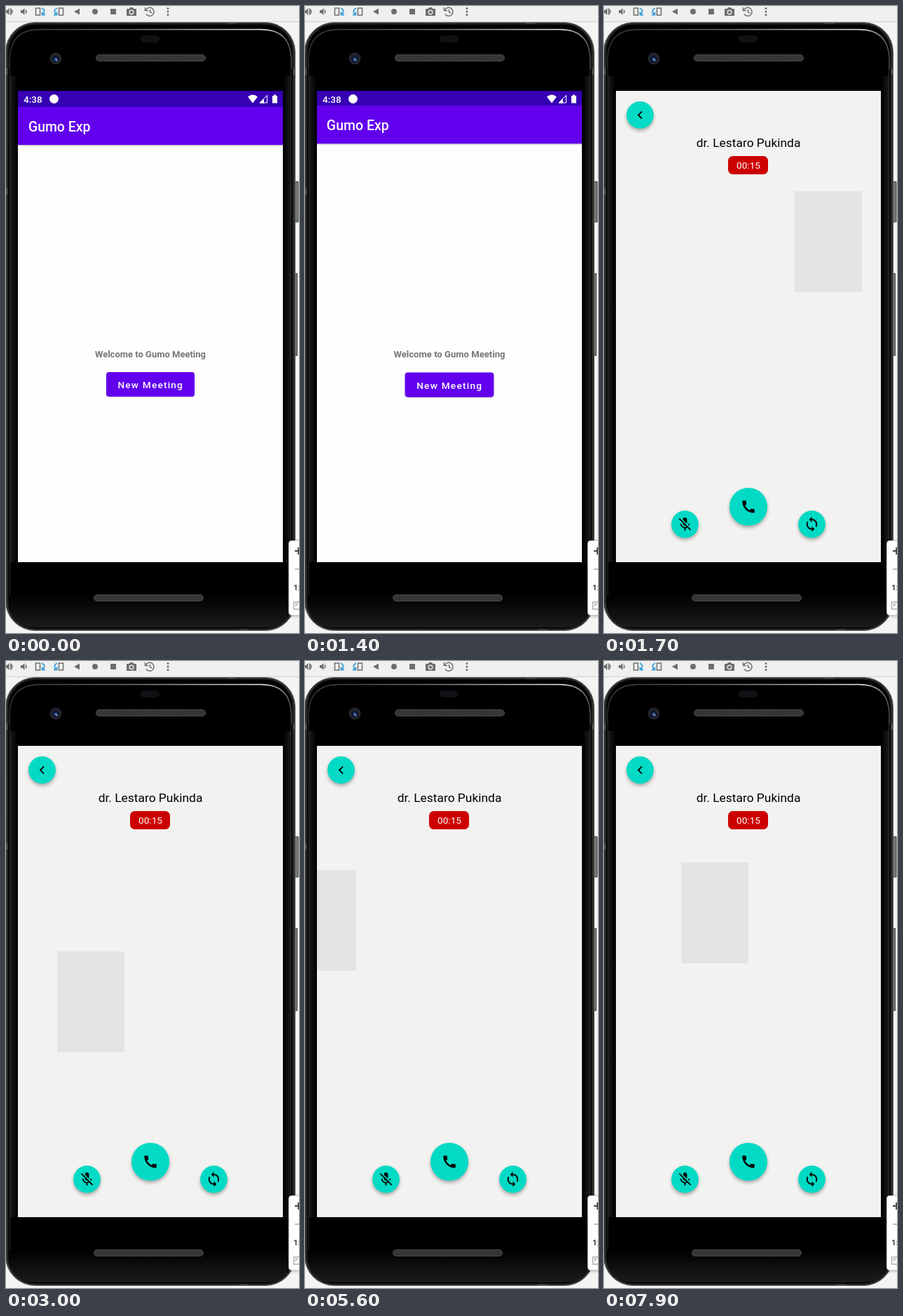
An HTML page that plays this animation: 418 by 894 pixels, repeating every 8 s.

```html
<!DOCTYPE html>
<html lang="en">
<head>
<meta charset="utf-8">
<title>Meeting demo</title>
<style>
  html, body { margin: 0; width: 100%; height: 100%; overflow: hidden; background: #f4f4f3; }
  svg { display: block; width: 418px; height: 894px; font-family: Roboto, sans-serif; }
  .mid { text-anchor: middle; }
  .line { fill: none; stroke: #6e6e6e; stroke-width: 1.5; }
  .blue { fill: none; stroke: #389fd6; stroke-width: 1.8; }
  .fab circle { fill: #03dac5; filter: drop-shadow(0 3px 2.5px rgba(0, 0, 0, .3)); }
</style>
</head>
<body>
<svg viewBox="0 0 418 894">
  <defs>
    <clipPath id="screen"><path d="M17 121H395V793H17z"/></clipPath>
    <pattern id="mesh" width="3" height="4" patternUnits="userSpaceOnUse">
      <rect width="3" height="4" fill="#151515"/>
      <path d="M0 0L1.5 2L0 4M1.5 0L3 2L1.5 4" fill="none" stroke="#555" stroke-width=".8"/>
    </pattern>
    <linearGradient id="shine">
      <stop offset="0" stop-color="#333"/><stop offset=".45" stop-color="#777"/>
      <stop offset=".9" stop-color="#eee"/><stop offset="1" stop-color="#555"/>
    </linearGradient>
    <linearGradient id="chin" x2="0" y2="1">
      <stop offset=".5" stop-color="#000"/><stop offset="1" stop-color="#1b1c1b"/>
    </linearGradient>
    <linearGradient id="edge">
      <stop offset="0" stop-color="#1d1e1d"/><stop offset="1" stop-color="#000"/>
    </linearGradient>
    <g id="speaker">
      <rect x=".5" y=".5" width="156" height="9" rx="4.5" fill="url(#mesh)" stroke="#4a4a48"/>
    </g>
    <g id="volume">
      <path d="M-5 -2H-2.500L.5 -5V5L-2.500 2H-5z" fill="#6e6e6e"/>
      <path class="line" d="M2 -2.500Q4 0 2 2.500"/>
    </g>
  </defs>

  <!-- emulator toolbar -->
  <rect width="418" height="22" fill="#f0f0ef"/>
  <path d="M0 22.500H418" stroke="#d0d0cf"/>
  <use href="#volume" x="4" y="8"/>
  <path class="line" d="M6 3.500Q12 8 6 12.500"/>
  <use href="#volume" x="26" y="8"/>
  <path class="line" d="M42.500 3H48.500V13H42.500zM75.500 3H81.500V13H75.500z"/>
  <path class="blue" d="M51 3Q58 7 52 12M56 12.500H51.500V8.500M73 3Q66 7 72 12M68 12.500H72.500V8.500"/>
  <path d="M97 8L105 3.500V12.500zM149 4H157V12H149zM172 4H175.500L177 2H181L182.500 4H186V14H172z" fill="#6e6e6e"/>
  <circle cx="127" cy="8" r="4" fill="#6e6e6e"/>
  <circle cx="179" cy="9" r="2.800" fill="#6e6e6e" stroke="#f0f0ef" stroke-width="1.300"/>
  <path class="line" d="M199.500 6A6 6 0 1 1 200 11.500M198.500 2V6.500H203M205.500 5V8.500L208 10"/>
  <path d="M231 3.500v0M231 8v0M231 12.500v0" stroke="#6e6e6e" stroke-width="3" stroke-linecap="round"/>

  <!-- phone body -->
  <path d="M412 250.500H417V308H412zM412 381.500H415.500V498.500H412z" fill="#777875" stroke="#454644"/>
  <rect x="-.5" y="23.500" width="413" height="867" rx="42" fill="#30322f" stroke="#5b5d5a"/>
  <path d="M0 89H5V98H0zM408 89H413V98H408zM0 260H5V269H0zM315 23H328V27H315zM332 887H345V891H332z" fill="#555753"/>
  <rect x="3" y="26" width="406" height="862" rx="39" fill="#000" stroke="#181918" stroke-width="1.500"/>
  <path d="M5 100H16V800H5z" fill="url(#edge)"/>
  <path d="M5 100H16V800H5z" fill="url(#edge)" transform="matrix(-1 0 0 1 412 0)"/>
  <path d="M5 793H407V850Q407 886 370 886H42Q5 886 5 850z" fill="url(#chin)"/>
  <path d="M5 90V76Q6 33.500 48 33.500H364Q406 33.500 407 76V90" fill="none" stroke="url(#shine)" stroke-width="1.300"/>
  <path d="M5.500 90V840M406.500 90V840" stroke="#2c2d2b"/>
  <rect x="192" y="42" width="27" height="10" rx="5" fill="#101114"/>
  <circle cx="71" cy="75" r="8.500" fill="#23252b"/>
  <circle cx="71" cy="75.500" r="5" fill="#0c1730"/>
  <circle cx="71" cy="76" r="2.300" fill="#3e63a6"/>
  <circle cx="72.500" cy="77.500" r=".9" fill="#b5cdf5"/>
  <use href="#speaker" x="128" y="69"/>
  <use href="#speaker" x="125" y="839"/>

  <!-- magnifier panel -->
  <rect x="403.500" y="762.500" width="30" height="106" rx="4" fill="#fff" stroke="#cfcfcf" style="filter:drop-shadow(0 1px 2px rgba(0,0,0,.3))"/>
  <path d="M412 777H422M417 772V782" stroke="#444" stroke-width="1.800"/>
  <path d="M412 803H422" stroke="#aaa" stroke-width="1.500"/>
  <text x="410" y="833" font-size="11.500" font-weight="700" fill="#444">1:1</text>
  <path d="M410.500 850H424V860H410.500zM413.500 856V853H416.500" fill="none" stroke="#aaa" stroke-width="1.300"/>

  <g clip-path="url(#screen)">
    <g id="home">
      <path d="M17 121H395V793H17z" fill="#fefefe"/>
      <path d="M17 144H395V198H17z" fill="#6200ee" style="filter:drop-shadow(0 1px 1px rgba(0,0,0,.3))"/>
      <path d="M17 121H395V144H17z" fill="#3700b3"/>
      <text x="32" y="179" font-size="19.400" font-weight="500" fill="#fff">Gumo Exp</text>
      <text class="mid" x="206" y="501" font-size="13" font-weight="700" fill="#757575">Welcome to Gumo Meeting</text>
      <rect id="button" x="143" y="522" width="126" height="35" rx="4" fill="#6200ee"/>
      <rect id="ripple" x="143" y="522" width="126" height="35" rx="4" fill="#fff"/>
      <text x="159.500" y="545" font-size="13.600" font-weight="500" letter-spacing="1.210" fill="#fff">New Meeting</text>
    </g>
    <g id="status" fill="#fff">
      <text x="25" y="138" font-size="13.600" font-weight="500">4:38</text>
      <circle cx="68.500" cy="132.500" r="6.500"/>
      <path d="M352 138.500L345 129.500Q352 123.500 359 129.500zM380 128H382V126.500H385V128H387V138.500H380zM368 132V138.500H361.500z"/>
      <path d="M372.500 127.500V138H362z" fill="none" stroke="#fff"/>
    </g>
    <g id="call">
      <path d="M17 121H395V793H17z" fill="#f2f2f0"/>
      <rect id="tile" width="96" height="144" fill="#e4e4e2"/>
      <text class="mid" x="206" y="201" font-size="17.400">dr. Lestaro Pukinda</text>
      <rect x="177" y="214" width="57" height="26" rx="6.500" fill="#c00"/>
      <text class="mid" x="206" y="232" font-size="13.600" fill="#fff">00:15</text>
      <g id="fabs"></g>
    </g>
  </g>
</svg>
<script>
const $ = id => document.getElementById(id);

const icons = {
  back: 'M15.41 7.41L14 6l-6 6 6 6 1.41-1.41L10.83 12z',
  phone: 'M20.01 15.38c-1.23 0-2.42-.2-3.53-.56-.35-.12-.74-.03-1.01.24l-1.57 1.97c-2.83-1.35-5.48-3.9-6.89-6.83l1.95-1.66c.27-.28.35-.67.24-1.02-.37-1.11-.56-2.3-.56-3.53 0-.54-.45-.99-.99-.99H4.19C3.65 3 3 3.24 3 3.99 3 13.28 10.73 21 20.01 21c.71 0 .99-.63.99-1.18v-3.45c0-.54-.45-.99-.99-.99z',
  muted: 'M19 11h-1.7c0 .74-.16 1.43-.43 2.05l1.23 1.23c.56-.98.9-2.09.9-3.28zm-4.02.17c0-.06.02-.11.02-.17V5c0-1.66-1.34-3-3-3S9 3.34 9 5v.18l5.98 5.99zM4.27 3L3 4.27l6.01 6.01V11c0 1.66 1.33 3 2.99 3 .22 0 .44-.03.65-.08l1.66 1.66c-.71.33-1.5.52-2.31.52-2.76 0-5.3-2.1-5.3-5.1H5c0 3.41 2.72 6.23 6 6.72V21h2v-3.28c.91-.13 1.77-.45 2.54-.9L19.73 21 21 19.73z',
  sync: 'M12 4V1L8 5l4 4V6c3.31 0 6 2.69 6 6 0 1.01-.25 1.97-.7 2.8l1.46 1.46C19.54 15.03 20 13.57 20 12c0-4.42-3.58-8-8-8zm0 14c-3.31 0-6-2.69-6-6 0-1.01.25-1.97.7-2.8L5.24 7.74C4.46 8.97 4 10.43 4 12c0 4.42 3.58 8 8 8v3l4-4-4-4v3z'
};
const fab = (x, y, r, icon) => `<g class="fab" transform="translate(${x} ${y})">
  <circle r="${r}"/><path d="${icons[icon]}" transform="scale(.97) translate(-12 -12)"/></g>`;
$('fabs').innerHTML = fab(51.5, 155.5, 19.4, 'back') + fab(206, 714, 27.1, 'phone') +
  fab(115.5, 739, 19.4, 'muted') + fab(296.5, 739, 19.4, 'sync');

// Keys are [time, value, ...]; values between keys are linear.
const press = [[800, 0], [900, .06], [1000, .16], [1200, .21], [1300, .12], [1400, 0]];
const lift = [[900, 0], [1100, 1], [1300, 1], [1400, .1]];
const enter = [[1372, 0], [1400, .043], [1500, .857], [1600, .965], [1700, 1]];
const drag = [
  [2000, 272, 264], [2100, 266, 262], [2300, 241, 258], [2400, 216, 312], [2500, 187, 377],
  [2800, 24, 414], [2900, 40, 416], [3000, 73, 414], [3400, 138, 270], [3800, 196, 114],
  [3900, 232, 110], [4000, 270, 109], [4200, 306, 126], [4400, 265, 158], [4600, 199, 183],
  [4800, 118, 263], [5100, 89, 281], [5300, 62, 286], [5400, 36, 288], [5600, -23, 298],
  [6000, -23, 298], [6300, 75, 322], [6600, 210, 364], [6900, 290, 378],
  [7100, 279, 378], [7300, 255, 374], [7600, 168, 346], [7800, 118, 313], [7900, 110, 287]
];

function at(keys, t) {
  const i = keys.findIndex(k => k[0] > t);
  if (i === 0) return keys[0].slice(1);
  if (i < 0) return keys[keys.length - 1].slice(1);
  const a = keys[i - 1], b = keys[i], p = (t - a[0]) / (b[0] - a[0]);
  return a.slice(1).map((v, j) => v + (b[j + 1] - v) * p);
}

const grow = s => `translate(206 457) scale(${s}) translate(-206 -457)`;

function draw(t) {
  const [p] = at(enter, t), [z] = at(lift, t);
  $('ripple').setAttribute('opacity', at(press, t)[0]);
  $('button').style.filter = `drop-shadow(0 ${1 + 3 * z}px ${1 + 3 * z}px rgba(0,0,0,${.15 + .15 * z}))`;
  $('home').setAttribute('transform', grow(1 + .15 * p));
  $('call').setAttribute('transform', grow(.85 + .15 * p));
  $('call').style.display = t < 1422 ? 'none' : '';
  $('status').style.display = t < 1500 ? '' : 'none';
  $('tile').setAttribute('transform', `translate(${at(drag, t)})`);
}

// The screen advances in steps of 100 ms.
const start = performance.now();
function tick() {
  const t = (performance.now() - start) % 8000;
  draw(t - t % 100);
  requestAnimationFrame(tick);
}
tick();
</script>
</body>
</html>
```
